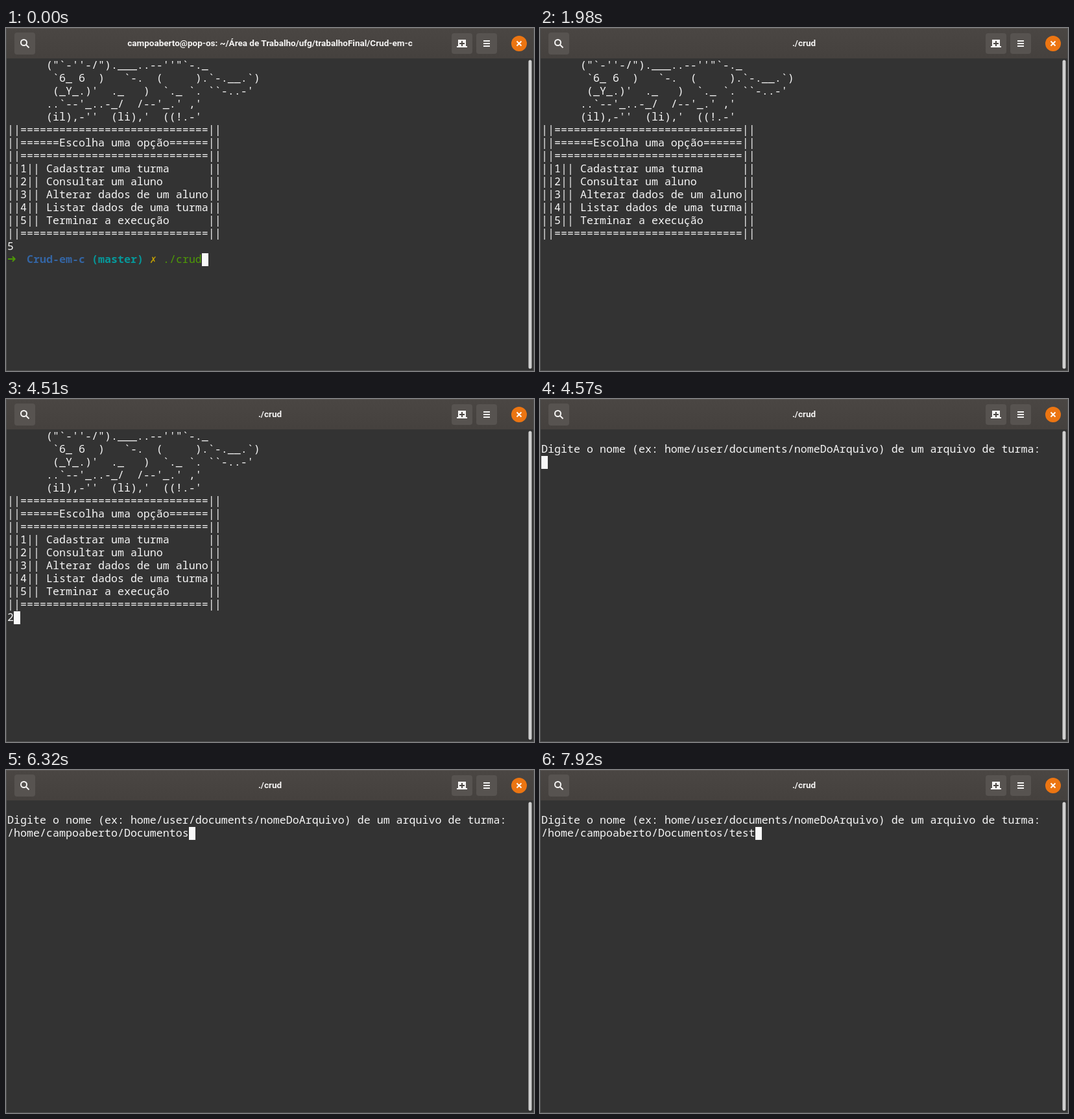
An HTML page that plays this animation: 814x530 px, repeating every 8000 ms.

```html
<!DOCTYPE html>
<html lang="pt-BR">
<head>
<meta charset="utf-8">
<title>Terminal</title>
<style>
  html, body { margin: 0; width: 100%; height: 100%; overflow: hidden; background: #333; }
  #window { position: relative; width: 814px; height: 530px; overflow: hidden; background: #333; }
  #chrome { position: absolute; inset: 0; }
  #title {
    position: absolute; top: 13px; left: 0; width: 814px;
    font: 700 13.5px/20px Roboto, "Noto Sans", sans-serif;
    color: #f6f5f4; text-align: center; white-space: pre;
  }
  #screen { position: absolute; left: 2px; top: 48px; }
  pre {
    position: absolute; left: 0; top: -1px; margin: 0; color: #f6f6f6;
    font: 16.6667px/20px "Noto Sans Mono", "DejaVu Sans Mono", monospace;
    font-variant-ligatures: none;
  }
  #shell { top: 279px; }
  .glyph { display: inline-block; width: 10px; height: 20px; vertical-align: top; }
  .arrow { font-family: "DejaVu Sans", sans-serif; }
  .green { color: #4e9a06; }
  .blue { color: #3465a4; font-weight: 700; }
  .teal { color: #06989a; font-weight: 700; }
  .gold { color: #c4a000; }
  #cursor { position: absolute; width: 10px; height: 20px; background: #f8f8f8; }
</style>
</head>
<body>
<div id="window">
  <svg id="chrome" width="814" height="530">
    <defs>
      <linearGradient id="bar" x2="0" y2="1">
        <stop stop-color="#4a4643"/>
        <stop offset="1" stop-color="#45413e"/>
      </linearGradient>
    </defs>
    <rect width="814" height="47" fill="url(#bar)"/>
    <path d="M0 .5H814" stroke="#5b5754"/>
    <path d="M.5 0V530M813.5 0V530M0 529.5H814" stroke="#505050"/>
    <g fill="#575350">
      <rect x="13" y="7" width="32" height="34" rx="4"/>
      <rect x="687" y="8" width="32" height="32" rx="4"/>
      <rect x="725" y="8" width="32" height="32" rx="4"/>
    </g>
    <g fill="none" stroke="#f6f5f4" stroke-width="2">
      <circle cx="27.5" cy="22.5" r="4.5"/>
      <path d="M31 26L35.5 30.5"/>
      <path d="M736 20H746M736 24H746M736 28H746"/>
    </g>
    <path d="M697 18H709V28H711V30H695V28H697Z" fill="#f6f5f4"/>
    <path d="M703 20V28M699 24H707" stroke="#4b4744" stroke-width="2"/>
    <circle cx="791" cy="24" r="12" fill="#ec7512"/>
    <path d="M787.5 20.5L794.5 27.5M794.5 20.5L787.5 27.5" stroke="#fff" stroke-width="2"/>
    <rect x="805.5" y="49.5" width="5" height="477" rx="2.5" fill="#d0d0d0"/>
  </svg>
  <div id="title"></div>
  <div id="screen">
<pre id="menu">      ("`-''-/").___..--''"`-._
       `6_ 6  )   `-.  (     ).`-.__.`)
       (_Y_.)'  ._   )  `._ `. ``-..-'
      ..`--'_..-_/  /--'_.' ,'
      (il),-''  (li),'  ((!.-'
||=============================||
||======Escolha uma opção======||
||=============================||
||1|| Cadastrar uma turma      ||
||2|| Consultar um aluno       ||
||3|| Alterar dados de um aluno||
||4|| Listar dados de uma turma||
||5|| Terminar a execução      ||
||=============================||</pre>
<pre id="shell">5
<span class="glyph arrow green">➜</span>  <span class="blue">Crud-em-c</span> <span class="teal">(master)</span> <span class="glyph gold">✗</span> <span class="green">./crud</span></pre>
<pre id="ask">
 
Digite o nome (ex: home/user/documents/nomeDoArquivo) de um arquivo de turma:</pre>
<pre id="typed"></pre>
    <div id="cursor"></div>
  </div>
</div>
<script>
  const LOOP = 8000, CELL = 10, LINE = 20;
  const RUN = 1430, RETITLE = 1510, ASK = 4570;
  const shellTitle = 'campoaberto@pop-os: ~/Área de Trabalho/ufg/trabalhoFinal/Crud-em-c';

  const choiceKeys = [[3720, '2']];
  const pathKeys = [
    [6320, '/home/campoaberto/Documentos'],
    [7040, '/'], [7310, 't'], [7470, 'e'], [7680, 's'], [7920, 't']
  ];
  const cursorOff = [
    [580, 1160], [1980, 2580], [3180, 3660], [4240, 4510], [5070, 5670], [6620, 6980]
  ];

  const el = id => document.getElementById(id);
  const [title, menu, shell, ask, typed, cursor] =
    ['title', 'menu', 'shell', 'ask', 'typed', 'cursor'].map(el);

  const show = (node, on) => { node.style.visibility = on ? 'visible' : 'hidden'; };
  const setText = (node, text) => { if (node.textContent !== text) node.textContent = text; };
  const textAt = (keys, t) => keys.filter(([at]) => t >= at).map(([, s]) => s).join('');

  function draw(t) {
    const inShell = t < RUN, asking = t >= ASK;
    const input = textAt(asking ? pathKeys : choiceKeys, t);
    const row = inShell ? 15 : asking ? 2 : 14;
    const col = inShell ? 30 : input.length;

    setText(title, t < RETITLE ? shellTitle : './crud');
    setText(typed, input);
    typed.style.top = row * LINE - 1 + 'px';
    cursor.style.left = col * CELL + 'px';
    cursor.style.top = row * LINE + 'px';

    show(menu, !asking);
    show(shell, inShell);
    show(ask, asking);
    show(cursor, !cursorOff.some(([from, to]) => t >= from && t < to));
  }

  const start = performance.now();
  function tick() {
    draw((performance.now() - start) % LOOP);
    requestAnimationFrame(tick);
  }
  tick();
</script>
</body>
</html>
```
